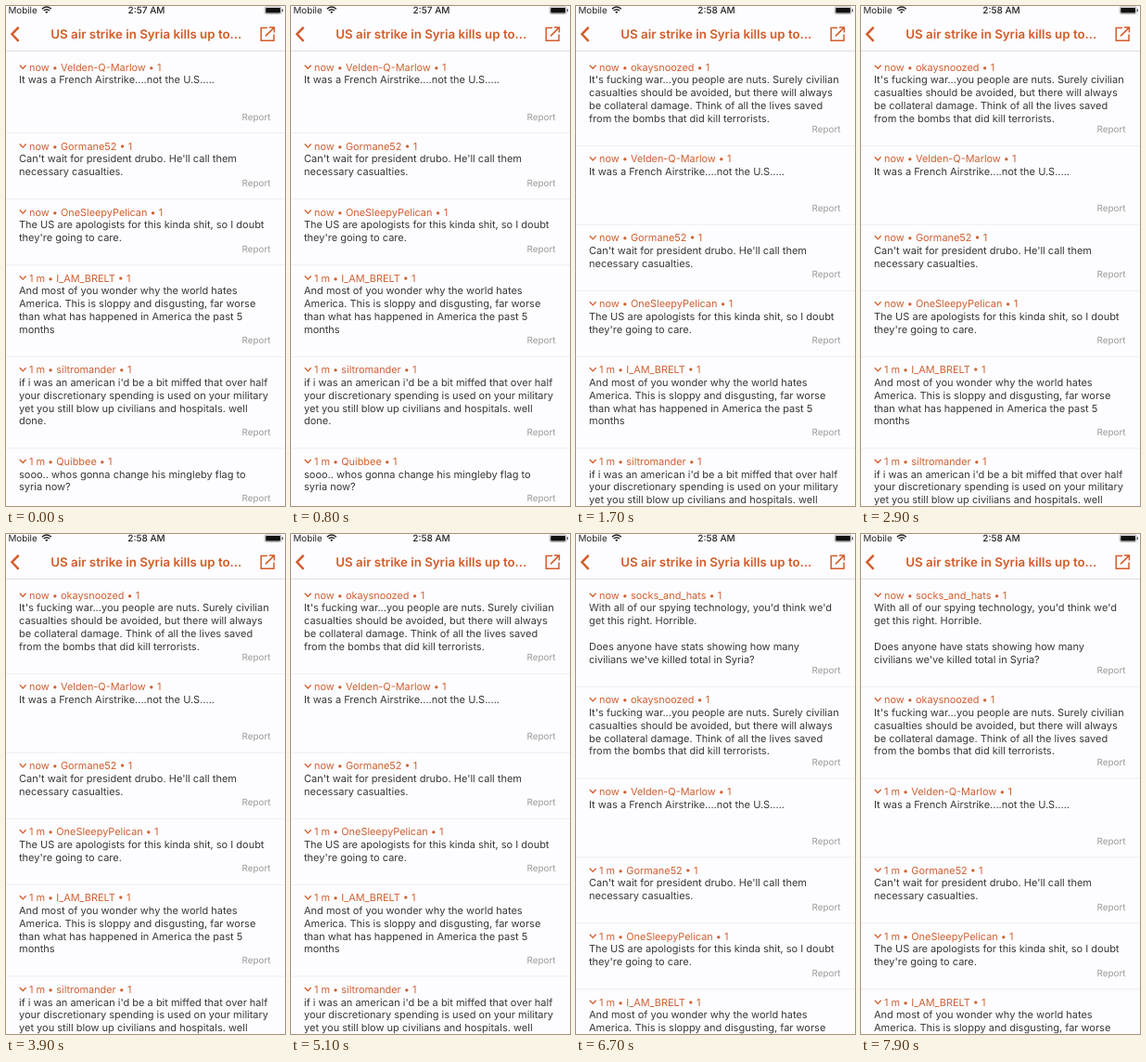
Write an HTML page that moves like this. It is 301x538 px and loops after 8 s.

```html
<!DOCTYPE html>
<html lang="en">
<head>
<meta charset="utf-8">
<title>Live comments</title>
<style>
  html, body { margin: 0; width: 100%; height: 100%; overflow: hidden; background: #fdfcfe; }
  svg { display: block; width: 301px; height: 538px; }
  text { font-family: Inter, Roboto, "Liberation Sans", sans-serif; text-rendering: geometricPrecision; white-space: pre; }
  .status { font-size: 9.8px; fill: #222; }
  .clock { font-size: 10px; font-weight: 500; text-anchor: middle; }
  .title { font-size: 13.3px; font-weight: 600; fill: #d35b29; text-anchor: middle; }
  .head { font-size: 10.9px; fill: #cf5f30; }
  .body { font-size: 11px; fill: #383838; }
  .report { font-size: 9.9px; fill: #9b9b9b; text-anchor: end; }
  .icon { fill: none; stroke: #d35b29; }
  .rule { stroke: #ebeaec; stroke-width: .8; }
</style>
</head>
<body>
<svg viewBox="0 0 301 538" xmlns="http://www.w3.org/2000/svg">
  <rect width="301" height="538" fill="#fdfcfe"/>
  <g id="list"></g>
  <path d="M0 48.3H301" stroke="#d6d5d7" stroke-width=".8"/>
  <text class="status" x="2.5" y="8">Mobile</text>
  <g fill="none" stroke="#222" stroke-width="1.4">
    <path d="M38.8 3.2Q43.8 -1.2 48.8 3.2M40.6 5.1Q43.8 2.2 47 5.1"/>
    <path d="M42.2 6.4Q43.8 5 45.4 6.4L43.8 8.1Z" fill="#222" stroke="none"/>
  </g>
  <text class="status clock" id="clock" x="151.5" y="8"></text>
  <rect x="279.2" y="1" width="17.8" height="7.4" rx="1.5" fill="none" stroke="#777" stroke-width=".6"/>
  <rect x="280.2" y="1.9" width="15.8" height="5.6" rx=".8" fill="#111"/>
  <rect x="297.7" y="3.2" width="1.2" height="3" rx=".6" fill="#444"/>
  <path class="icon" d="M13.6 22.8L6.4 30.3L13.6 37.8" stroke-width="2.4"/>
  <text class="title" x="151.3" y="35">US air strike in Syria kills up to...</text>
  <g class="icon" stroke-width="1.5">
    <path d="M282 23.6H275.2V37.2H289V30.5"/>
    <path d="M280 32.4L289 23.4M284 23H289.4V28.4"/>
  </g>
</svg>
<script>
const LOOP = 8000, LINE = 13.85, NEVER = Infinity;

// Newest first: user, time it appears, time its age turns to "1 m", lines.
const comments = [
  ["socks_and_hats", 6700, NEVER, [
    "With all of our spying technology, you'd think we'd",
    "get this right. Horrible.",
    "",
    "Does anyone have stats showing how many",
    "civilians we've killed total in Syria?"]],
  ["okaysnoozed", 1700, NEVER, [
    "It's fucking war...you people are nuts. Surely civilian",
    "casualties should be avoided, but there will always",
    "be collateral damage. Think of all the lives saved",
    "from the bombs that did kill terrorists."]],
  ["Velden-Q-Marlow", 0, 7500, [
    "It was a French Airstrike....not the U.S.....", "", ""]],
  ["Gormane52", 0, 5200, [
    "Can't wait for president drubo. He'll call them",
    "necessary casualties."]],
  ["OneSleepyPelican", 0, 3200, [
    "The US are apologists for this kinda shit, so I doubt",
    "they're going to care."]],
  ["I_AM_BRELT", 0, 0, [
    "And most of you wonder why the world hates",
    "America. This is sloppy and disgusting, far worse",
    "than what has happened in America the past 5",
    "months"]],
  ["siltromander", 0, 0, [
    "if i was an american i'd be a bit miffed that over half",
    "your discretionary spending is used on your military",
    "yet you still blow up civilians and hospitals. well",
    "done."]],
  ["Quibbee", 0, 0, [
    "sooo.. whos gonna change his mingleby flag to",
    "syria now?"]]
];

const list = document.getElementById("list");
const clock = document.getElementById("clock");
const text = (cls, x, y, s) => `<text class="${cls}" x="${x}" y="${y.toFixed(2)}">${s}</text>`;

function cell([user, , aged, lines], y, t) {
  const age = t >= aged ? "1 m" : "now";
  const rule = y > 80 ? `<path class="rule" d="M0 ${y - 18}H301"/>` : "";
  return rule +
    `<path class="icon" stroke-width="1.3" d="M14.8 ${y - 6}l3.4 3.6l3.4 -3.6"/>` +
    text("head", 25, y, `${age} • ${user} • 1`) +
    lines.map((s, i) => s && text("body", 14, y + 13.6 + i * LINE, s)).join("") +
    text("report", 285.5, y + 11.3 + lines.length * LINE, "Report");
}

function render(t) {
  let y = 69.7, out = "";
  for (const c of comments) {
    if (t < c[1] || y > 550) continue;
    out += cell(c, y, t);
    y += 43.3 + c[3].length * LINE;
  }
  list.innerHTML = out;
  clock.textContent = t < 1700 ? "2:57 AM" : "2:58 AM";
}

// The picture only changes at these moments.
const cues = comments.flatMap(c => [c[1], c[2]]).filter(Number.isFinite);
let shown = -1;
function tick() {
  const t = performance.now() % LOOP;
  const cue = Math.max(...cues.filter(c => c <= t));
  if (cue !== shown) render(shown = cue);
  requestAnimationFrame(tick);
}
tick();
</script>
</body>
</html>
```
